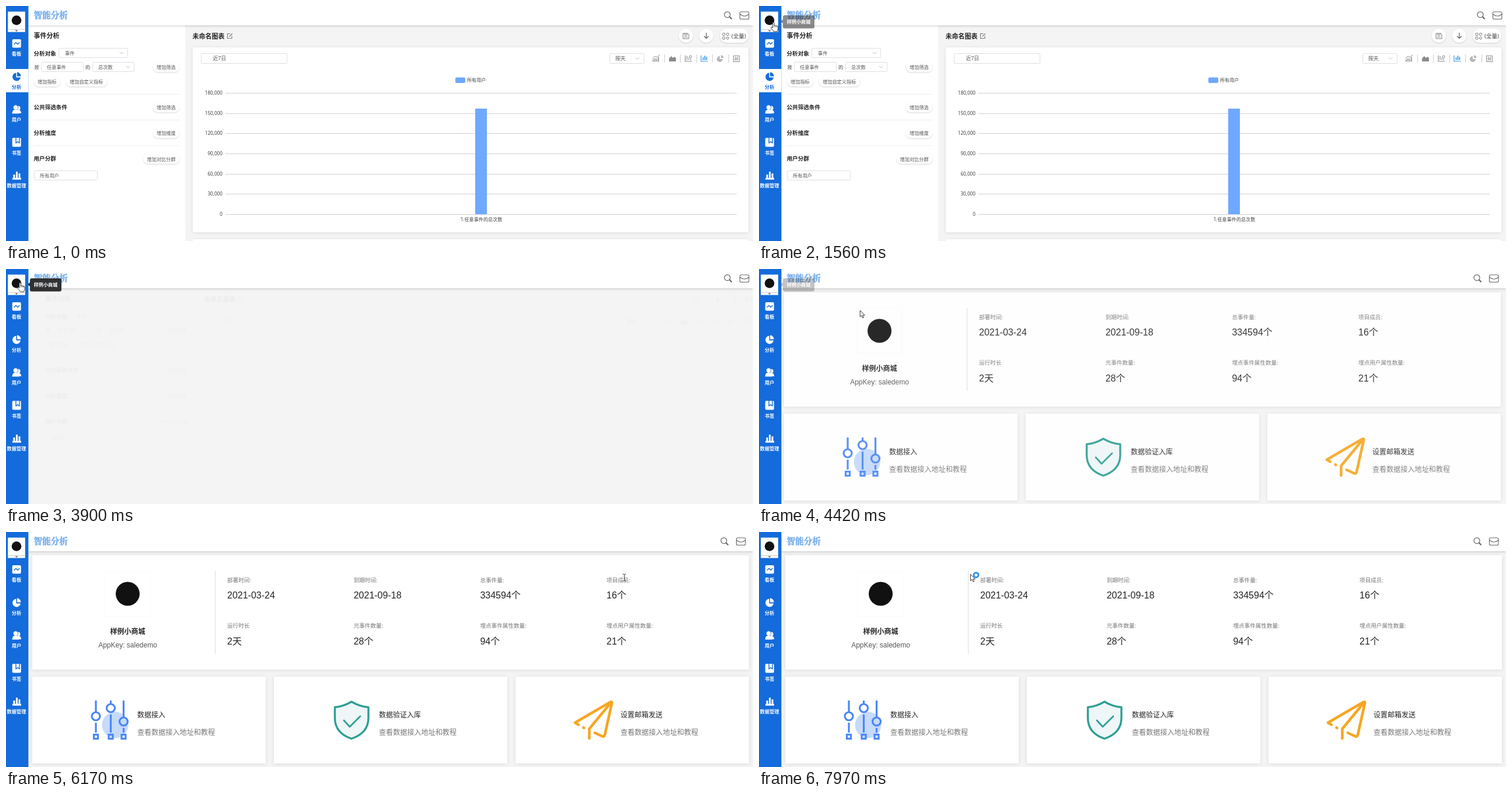
These frames come from a looping animation (1280x403 px, 7.99 s). An HTML page:

```html
<!DOCTYPE html>
<html lang="zh-CN">
<head>
<meta charset="utf-8">
<title>智能分析</title>
<style>
html, body { margin: 0; width: 100%; height: 100%; overflow: hidden; background: #f4f4f4; }
svg { display: block; width: 100vw; height: 100vh; font-family: "Noto Sans", "Noto Sans CJK SC", sans-serif; }
text { white-space: pre; }
.arial { font-family: "Liberation Sans", "Noto Sans CJK SC", sans-serif; }
.title { font-family: "Noto Serif CJK SC", "Noto Sans CJK SC", serif; font-weight: 700; stroke: #7bb0ee; stroke-width: .6; }
.card { fill: #fff; filter: drop-shadow(0 1.5px 3px rgba(0,0,0,.1)); }
.pill { fill: #fff; filter: drop-shadow(0 1px 1px rgba(0,0,0,.16)); }
.line { fill: none; stroke-linecap: round; stroke-linejoin: round; }
.menu { font-weight: 600; text-anchor: middle; }
</style>
</head>
<body>
<svg id="stage" viewBox="0 0 1280 403"></svg>
<script>
const LOOP = 7990, BLUE = '#146bdb', BAR = '#6fa8ff';
const PROJECT = '样例小商城', APP_KEY = 'saledemo';

// Markup helpers; text is placed by its vertical centre.
const text = (x, y, s, size = 8.2, fill = '#444', extra = '') =>
  `<text x="${x}" y="${y + size * .37}" font-size="${size}" fill="${fill}" ${extra}>${s}</text>`;
const rect = (x, y, w, h, fill, extra = '') =>
  `<rect x="${x}" y="${y}" width="${w}" height="${h}" fill="${fill}" ${extra}/>`;
const circle = (x, y, r, fill, extra = '') =>
  `<circle cx="${x}" cy="${y}" r="${r}" fill="${fill}" ${extra}/>`;
const line = (d, color, width = 1, extra = '') =>
  `<path class="line" d="${d}" stroke="${color}" stroke-width="${width}" ${extra}/>`;
const card = (x, y, w, h) => rect(x, y, w, h, '#fff', 'class="card" rx="2"');
const pill = (x, y, w, h) => rect(x, y, w, h, '#fff', `class="pill" rx="${h / 2}"`);
const field = (x, y, w, h, label, tx, arrow, size) =>
  rect(x + .5, y + .5, w - 1, h - 1, '#fff', 'stroke="#dcdfe6" rx="2"') +
  text(tx, y + h / 2, label, size, '#555') +
  (arrow ? line(`M${arrow - 3} ${y + h / 2 - 1.5}l3 3 3-3`, '#bbb', .9) : '');
const button = (x, y, w, label) => pill(x, y - 8, w, 16) + text(x + 6, y, label, 8.2, '#555');
const bold = 'font-weight="700"', mid = 'text-anchor="middle"';
const group = (id, body) => `<g id="${id}">${body}</g>`;

function queryPanel() {
  let s = rect(38, 33, 269, 370, '#fff') + text(47.5, 50.5, '事件分析', 11, '#222', bold);
  s += text(47.5, 81, '分析对象', 9.6, '#222', bold) + field(90, 72, 119, 17, '事件', 101, 198);
  s += text(48.5, 105, '按') + field(60, 96, 73, 17, '任意事件', 70) + text(136, 105, '的') +
    field(148, 96, 72, 17, '总次数', 158, 209);
  s += button(252, 105, 45, '增加筛选') + button(48, 130, 45, '增加指标') + button(103, 130, 70, '增加自定义指标');
  [['公共筛选条件', '增加筛选', 252], ['分析维度', '增加维度', 252], ['用户分群', '增加对比分群', 235.5]]
    .forEach(([name, label, x], i) => {
      const y = 173.5 + i * 44.2;
      s += rect(48, 151 + i * 44, 249, 1, '#eee') + text(47.5, y, name, 9.6, '#222', bold) +
        button(x, y + .7, 297 - x, label);
    });
  return s + field(48, 282, 109, 17, '所有用户', 58);
}

function chartIcons() {
  const g = '#8b8b8b';
  let s = '';
  for (let x = 1128; x < 1240; x += 27.4) s += rect(Math.round(x), 83, 1, 14, '#ccc');
  s += line('M1109 95v-3M1112 95v-5M1115 95v-4M1118 95v-7', g, 1.6) + line('M1108 90l4-4 3 2 5-4', g);
  s += `<path d="M1136 95v-5l4-4 3 3 2-2 3 2v6z" fill="${g}"/>`;
  s += line('M1164 85v10h11M1167 92v-6M1170 92v-3', g, 1.2) + circle(1173, 87, 2, 'none', `stroke="${g}"`) + line('M1173 90v3', g);
  s += line('M1191 85v10h11', '#3a9cf0', 1.2) + line('M1194.5 92v-3M1197.5 92v-6M1200.5 92v-4', '#3a9cf0', 1.8);
  s += '<path d="M1223 86a5 5 0 1 0 5 5h-5zM1225 84.5a4.5 4.5 0 0 1 4.5 4.5h-4.5z" fill="#b5b5b5"/>';
  s += rect(1246.5, 85.5, 10, 10, 'none', `stroke="${g}"`) + line('M1250.5 87.5l-1 6M1253.5 87.5l-1 6M1248.5 89.5h6M1248.5 92h6', g, .8);
  return s;
}

function plot() {
  let s = rect(770, 122.5, 17, 9.5, BAR, 'rx="2"') + text(790, 127, '所有用户', 8.1);
  for (let i = 0; i < 7; i++) {
    const y = 149 + i * 34.67;
    s += rect(376, Math.round(y), 876, 1, '#d0d0d0') +
      text(371, y, ((6 - i) * 30000).toLocaleString('en-US'), 8.2, '#444', 'text-anchor="end"');
  }
  s += rect(804, 176, 20, 181, BAR, 'id="bar"') + text(814.5, 366, '1.任意事件的总次数', 8.1, '#444', mid);
  s += group('pointer', rect(814, 149, 1, 208, '#aaa'));
  return s + group('tip', rect(0, 0, 93, 35, 'rgba(50,50,50,.7)', 'rx="3"') +
    text(3.5, 10.5, '1.任意事件的总次数', 9.4, '#fff') + circle(7.5, 25, 3.5, BAR) +
    text(11, 25, '所有用户: 156,602', 9.5, '#fff'));
}

function chartPanel() {
  let s = text(319.5, 51.5, '未命名图表', 11, '#222', bold) +
    line('M384 47.5h-4.5v8h7.5v-4M383 52l4.5-4.5', '#777', 1.1);
  s += pill(1153, 39, 24, 24) + pill(1188, 39, 24, 24) + pill(1223, 39, 49, 24);
  s += line('M1160.5 47h8l1.5 1.5v7.5h-9.5zM1163 47v3h4v-3M1162.5 53h5', '#777');
  s += line('M1200 46.5v9M1196.5 52l3.5 3.5 3.5-3.5', '#666', 1.3);
  for (const [x, y] of [[1228, 46.5], [1234.5, 46.5], [1228, 53]]) s += rect(x, y, 4, 4, 'none', 'stroke="#777" rx="1"');
  s += circle(1236.5, 55, 2, 'none', 'stroke="#777"') + text(1243, 51.5, '(全量)', 9.6);
  s += card(320, 71, 952, 317) + card(320, 400, 952, 20);
  s += field(334, 81, 148, 18, '近7日', 354.5, 0, 8.8) + field(1034, 81, 60, 18, '按天', 1044, 1082, 8.9);
  return s + chartIcons() + group('plot', plot());
}

function dashboard() {
  let s = card(45, 40, 1228, 196) + rect(358, 67, 1, 142, '#ddd') +
    rect(169.5, 67.5, 77, 77, '#fff', 'stroke="#fafafa"') + circle(208.5, 106, 20.5, '#111');
  s += text(208.5, 170.5, PROJECT, 12, '#222', `${bold} ${mid}`);
  s += text(208.5, 194, 'AppKey: ' + APP_KEY, 12, '#555', 'class="arial" ' + mid);
  [['部署时间:', '2021-03-24'], ['到期时间:', '2021-09-18'], ['总事件量:', '334594个'], ['项目成员:', '16个'],
   ['运行时长', '2天'], ['元事件数量:', '28个'], ['埋点事件属性数量:', '94个'], ['埋点用户属性数量:', '21个']]
    .forEach(([label, value], i) => {
      const x = 379 + i % 4 * 216.7, y = i < 4 ? 82 : 160.5;
      s += text(x, y, label, 9.6, '#777') + text(x, y + 26.3, value, 16, '#222', 'class="arial"');
    });
  ['数据接入', '数据验证入库', '设置邮箱发送'].forEach((name, i) => {
    const x = 45 + i * 414;
    s += card(x, 248, 400, 149) + text(x + 180, 314, name, 12, '#222') +
      text(x + 180, 343.5, '查看数据接入地址和教程', 12.1, '#777');
  });
  s += circle(187, 331, 22.5, '#c5dafc');
  for (const [x, y] of [[154, 316], [179.5, 302], [201.5, 325]]) {
    const stroke = 'stroke="#4a86f7" stroke-width="3.2"';
    s += `<path d="M${x} 289V${y - 7}M${x} ${y + 11}V344" ${stroke}/>` +
      circle(x, y, 7, 'none', stroke) + rect(x - 3.5, 347.5, 7, 7, 'none', stroke);
  }
  s += '<path d="M592 291Q605 299 621 300.5V319C621 338 608 349 592 354.5C576 349 563.5 338 563.5 319V300.5Q579 299 592 291Z" fill="#eff6f8" stroke="#2f9f94" stroke-width="3.4" stroke-linejoin="round"/>';
  s += line('M579 323l10 11 18-18', '#2f9f94', 2.8);
  return s + line('M981 330.500L975 327L1035 292Q1039 290 1038 294L1026 348Q1025 352 1021 350L1009 344.500M1037 292L999.500 337.500V354M989.500 335.500l1 .5', '#f5a623', 4.6);
}

function menuIcon(i, c, bg) {
  return [
    rect(10.7, 57, 15, 14.5, c, 'rx="2"') + line('M14 65.5l3-3 3 3 3-3', bg, 1.4),
    `<path d="M17.5 114.5a7 7 0 1 0 7.500 8h-7.500zM19 113.500a6.800 6.800 0 0 1 6.500 7h-6.500z" fill="${c}"/>`,
    circle(21, 175, 3.6, c) + `<path d="M19 184q0-6 3-6 4 1 4 6z" fill="${c}"/>` +
      circle(16.5, 174, 4.2, c, `stroke="${bg}" stroke-width=".8"`) + `<path d="M10.5 184.5q0-7 6-7t6 7z" fill="${c}"/>`,
    rect(10.7, 226, 15, 15.5, c, 'rx="2"') + line('M17 226v9l3-2.5 3 2.5v-9', bg, 1.4),
    `<path d="M11 296.2h15M14 295v-6M18.5 295v-11M23 295v-8" stroke="${c}" stroke-width="3"/>`
  ][i];
}

function sidebar() {
  let s = rect(0, 0, 38.4, 403, BLUE) + rect(3.2, 9.6, 29.6, 35, '#fff') + rect(3.2, 40, 29.6, 1, '#ccc') +
    '<path d="M15.5 41.5h5l-2.5 2.5z" fill="#666"/>' + circle(18, 24.5, 8.3, '#111');
  ['看板', '分析', '用户', '书签', '数据管理'].forEach((name, i) => {
    s += menuIcon(i, '#fff', BLUE) + text(18, 82.3 + i * 56.4, name, 8.2, '#fff', 'class="menu"');
  });
  return s + group('active', rect(0, 108, 38.4, 40, '#fff') + menuIcon(1, BLUE, '#fff') +
    text(18, 138.7, '分析', 8.2, BLUE, 'class="menu"'));
}

const header = rect(38, 0, 1242, 33, '#fff', 'style="filter:drop-shadow(0 1px 2px rgba(0,0,0,.2))"') +
  text(47.5, 16, '智能分析', 14.6, '#7bb0ee', 'class="title"') +
  group('tools', circle(1236, 14.8, 5, 'none', 'stroke="#666" stroke-width="1.2"') +
    line('M1240 18.8l3 3', '#666', 2.2) +
    rect(1257.5, 10, 15.5, 12.5, 'none', 'stroke="#666" stroke-width="1.1" rx="2"') +
    line('M1257.5 14q8 6.5 15.5 0', '#666', 1.1));

const hint = rect(41, 16, 54, 22.5, '#303133', 'rx="3"') + '<path d="M41 23v7l-4-3.5z" fill="#303133"/>' +
  text(68, 27, PROJECT, 8.1, '#fff', 'class="menu"');

const cursors =
  group('arrow', '<path d="M0 0V11L2.5 8.7L4.3 12.8L6.2 12L4.5 8.1H8Z" fill="#fff" stroke="#222" stroke-width=".9"/>') +
  group('hand', '<path d="M-1.2 1Q0-.8 1.3 1V5.5Q2.6 4.6 3.7 6Q5 5.2 6 6.5Q7.8 6 8 8V11Q7.8 13 6.5 16H.5Q-1.5 12.5-4 10Q-4.5 8-2.7 8.2L-1.2 9.5Z" fill="#fff" stroke="#222" stroke-width=".9"/><path d="M1.3 5.5V8.5M3.7 6V8.5M6 6.5V9" stroke="#222" stroke-width=".7"/>') +
  group('beam', line('M-2.5-6q2 0 2.5 1 .5-1 2.5-1M0-5V5M-2.5 6q2 0 2.5-1 .5 1 2.5 1', '#333')) +
  group('busy', circle(9.5, 1.2, 4, '#fff', 'stroke="#2f95ea" stroke-width="3"'));

const $ = id => document.getElementById(id);
$('stage').innerHTML = rect(0, 0, 1280, 403, '#f4f4f4') + group('query', queryPanel() + chartPanel()) +
  group('dash', dashboard()) + header + sidebar() + group('hint', hint) +
  circle(17.5, 20, 8.3, '#ffe800', 'id="click" opacity=".8"') + group('cursor', cursors);

// Keys: time, x, y
const path = [[390, 1186, 366], [540, 880, 345], [720, 375, 306], [820, 375, 306], [1000, 190, 160], [1180, 78, 68],
  [1210, 76, 66], [1450, 34, 34], [1700, 13, 20], [1860, 13, 20], [2050, 24, 23], [2270, 18, 21], [2420, 18, 21],
  [2460, 17, 20], [3290, 17, 20], [3600, 24, 23], [4080, 24, 23], [4180, 36, 30], [4420, 173, 71], [4890, 292, 100],
  [5150, 390, 62], [5450, 430, 124], [5710, 506, 110], [5760, 508, 108], [5950, 760, 62], [6170, 1059, 78],
  [6350, 1146, 100], [6510, 1144, 158], [6560, 1144, 159], [6850, 910, 190], [7120, 690, 218], [7330, 538, 208],
  [7380, 537, 206], [7650, 440, 145], [7900, 362.5, 72.5], [LOOP, 362.5, 72.5]];
const tipPath = [[420, 1073, 346], [720, 695, 316], [820, 695, 316]];

const clamp = v => Math.min(1, Math.max(0, v));
const ramp = (t, from, to) => clamp((t - from) / (to - from));

function along(keys, t) {
  const i = Math.max(1, keys.findIndex(k => k[0] >= t));
  const [a, b] = [keys[i - 1], keys[i]], u = ramp(t, a[0], b[0]);
  return [1, 2].map(n => a[n] + (b[n] - a[n]) * u);
}

// CSS "ease": cubic-bezier(.25, .1, .25, 1)
function ease(p) {
  let lo = 0, hi = 1, u;
  for (let i = 0; i < 20; i++) {
    u = (lo + hi) / 2;
    const x = .75 * u * (1 - u) ** 2 + .75 * u * u * (1 - u) + u ** 3;
    x < p ? lo = u : hi = u;
  }
  return .3 * u * (1 - u) ** 2 + 3 * u * u * (1 - u) + u ** 3;
}

const show = (id, on) => $(id).style.display = on ? '' : 'none';
const move = (id, x, y) => $(id).setAttribute('transform', `translate(${x} ${y})`);
const fade = (id, o) => { $(id).setAttribute('opacity', o); show(id, o > 0); };

function cursorKind(t, x, y) {
  if (t < 4180) return t > 1450 ? 'hand' : 'arrow';
  const overColumn = x > 378 && (x - 379) % 216.7 < 60;
  return overColumn && [82, 108, 160, 187].some(row => Math.abs(y - row) < 8) ? 'beam' : 'arrow';
}

function draw(t) {
  const hover = t >= 420 && t < 820;
  show('tip', hover);
  show('pointer', hover);
  $('bar').setAttribute('fill', hover ? '#7ab5ff' : BAR);
  if (hover) move('tip', ...along(tipPath, t));

  const out = ease(ramp(t, 3520, 4020)), enter = ease(ramp(t, 4110, 4610));
  fade('query', 1 - out);
  move('query', 20 * out, 0);
  show('plot', t < 3520);
  fade('dash', enter);
  move('dash', 20 * enter - 20, 0);
  show('active', t < 3520);
  move('tools', t < 4050 ? 0 : -6, 0);
  fade('hint', ramp(t, 1450, 1650) * (1 - ramp(t, 4290, 4475)));
  show('click', t >= 2670 && t < 3290);

  show('cursor', t >= 390);
  const [x, y] = along(path, t), kind = cursorKind(t, x, y);
  for (const k of ['arrow', 'hand', 'beam']) show(k, k === kind);
  show('busy', t >= 7800);
  move('cursor', x, y);
}

function tick() {
  draw(performance.now() % LOOP);
  requestAnimationFrame(tick);
}
tick();
</script>
</body>
</html>
```
